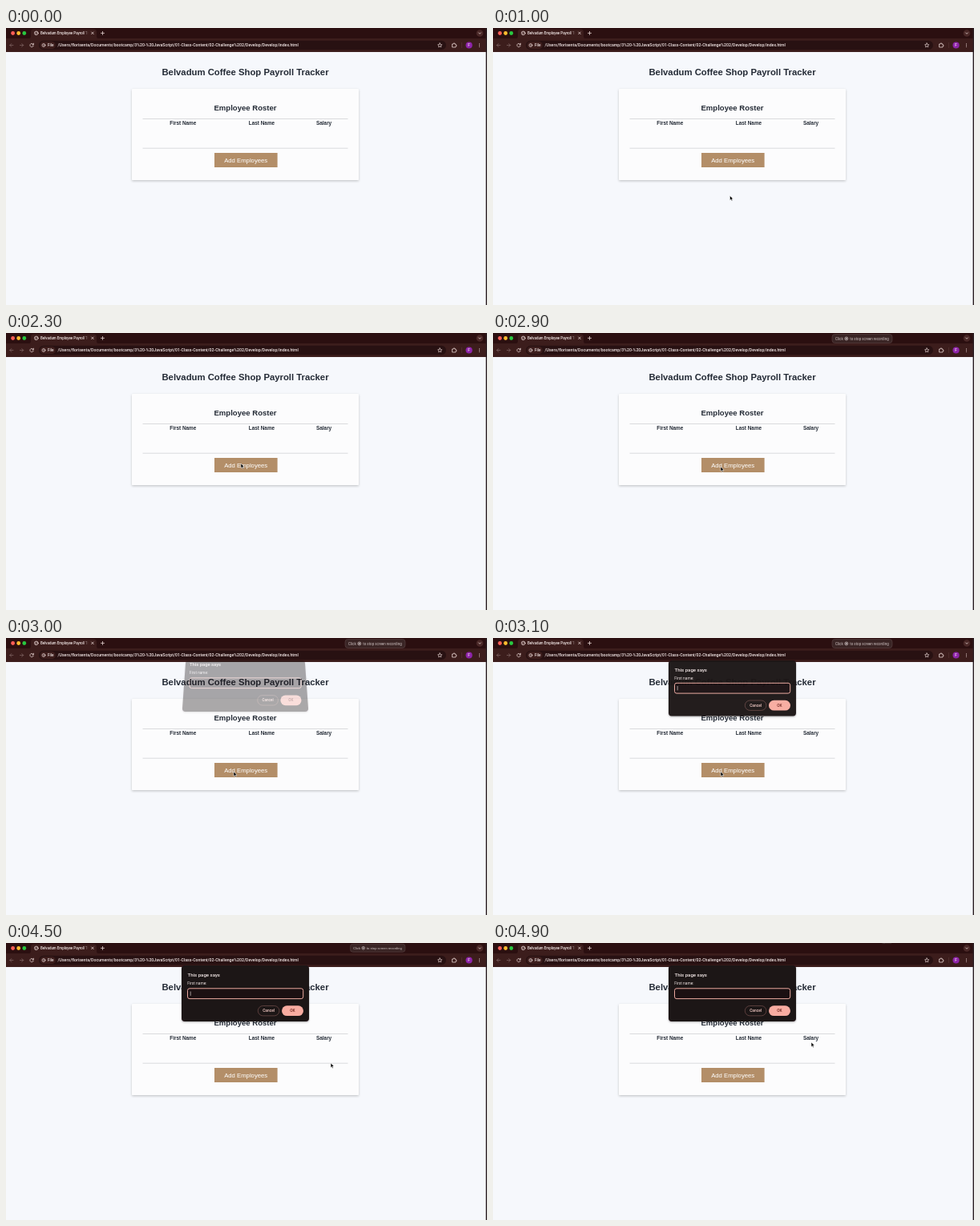
Animation, 600 px wide and 346 px high, one loop 5 s. Source, as an HTML page:

```html
<!DOCTYPE html>
<html lang="en">
<head>
<meta charset="utf-8">
<title>Payroll Tracker</title>
<style>
  html, body { margin: 0; width: 100%; height: 100%; overflow: hidden; background: #f6f8fc; }
  svg { display: block; width: 100%; height: 100%; }
  text { white-space: pre; }
  .page { font-family: "Liberation Sans", Arial, sans-serif; font-weight: 700; fill: #242b36; text-anchor: middle; }
  .ui { font-family: Roboto, Inter, sans-serif; font-weight: 500; fill: #f4e9e8; }
  .line { fill: none; stroke: #e6d3d1; stroke-width: .8; stroke-linecap: round; stroke-linejoin: round; }
  .dim { stroke: #7d6160; }
</style>
</head>
<body>
<svg viewBox="0 0 600 346">
  <defs>
    <filter id="cardShadow" x="-10%" y="-10%" width="120%" height="130%">
      <feDropShadow dx="0" dy="1.2" stdDeviation="1.5" flood-color="#000" flood-opacity=".22"/>
    </filter>
    <filter id="boxShadow" x="-10%" y="-10%" width="120%" height="130%">
      <feDropShadow dx="0" dy="1" stdDeviation="1.2" flood-color="#000" flood-opacity=".3"/>
    </filter>
    <linearGradient id="fade" gradientUnits="userSpaceOnUse" x1="96" x2="103" y1="0" y2="0">
      <stop offset="0" stop-color="#f4e9e8"/>
      <stop offset="1" stop-color="#f4e9e8" stop-opacity="0"/>
    </linearGradient>
    <clipPath id="tabClip"><rect x="40" y="0" width="63" height="13"/></clipPath>
  </defs>

  <!-- page -->
  <rect width="600" height="346" fill="#f6f8fc"/>
  <g class="page">
    <text x="298.5" y="59" font-size="11.32">Belvadum Coffee Shop Payroll Tracker</text>
    <rect x="157" y="76" width="283" height="114" rx="1" fill="#fcfcfd" filter="url(#cardShadow)"/>
    <text x="298.5" y="103.4" font-size="9.55">Employee Roster</text>
    <path d="M170.5 113.5H426.5M170.5 150.2H426.5" stroke="#d2d3d6" stroke-width=".8"/>
    <g font-size="6.4">
      <text x="220.8" y="120.8">First Name</text>
      <text x="319" y="120.8">Last Name</text>
      <text x="396.6" y="120.8">Salary</text>
    </g>
    <rect x="260" y="156" width="78.6" height="18" fill="#b38e68"/>
    <text x="299.2" y="167.6" font-size="7.72" style="font-weight:400;fill:#fff">Add Employees</text>
  </g>

  <!-- browser frame -->
  <rect width="600" height="14" fill="#2b0f10"/>
  <rect y="13" width="600" height="17" fill="#3c1d1c"/>
  <path d="M28 13.2q3 0 3-3V5q0-3.5 3.5-3.5h75q3.500 0 3.500 3.500v5.200q0 3 3 3z" fill="#3c1d1c"/>
  <circle cx="8.600" cy="6.500" r="2.400" fill="#ff5f57"/>
  <circle cx="15.700" cy="6.500" r="2.400" fill="#febc2e"/>
  <circle cx="22.800" cy="6.500" r="2.400" fill="#28c840"/>
  <g class="line">
    <circle cx="37.800" cy="6.400" r="2.300"/>
    <path d="M36 5.600l1.600.8-.5 1.600M38.400 4.500l.4 1.200 1 .4" stroke-width=".6"/>
    <path d="M106.600 5l2.700 2.700m0-2.700l-2.700 2.700M118.500 6.400h4m-2-2v4"/>
  </g>
  <g clip-path="url(#tabClip)">
    <text class="ui" x="43" y="8" font-size="4.45" style="fill:url(#fade)">Belvadum Employee Payroll Tracker</text>
  </g>
  <circle cx="591" cy="6.500" r="4.300" fill="#4a2827"/>
  <path class="line" d="M589.600 5.900l1.400 1.400 1.400-1.400"/>

  <rect x="41" y="15.800" width="508" height="11.400" rx="5.700" fill="#281112"/>
  <rect x="42.500" y="17" width="19.300" height="9" rx="4.500" fill="#3c1d1c"/>
  <path class="line dim" d="M9 21.500H4.800m2-2l-2 2 2 2M17.500 21.500h4.200m-2-2l2 2-2 2"/>
  <g class="line">
    <path d="M34.200 20.700a2.200 2.200 0 1 0 0 1.700M34.400 19.200v1.700h-1.700"/>
    <circle cx="47" cy="21.500" r="2" stroke-width=".7"/>
    <path d="M47 21.400v1M47 20.500v.05" stroke-width=".7"/>
    <path d="M541.200 18.900l.8 1.700 1.800.2-1.300 1.300.3 1.800-1.600-.9-1.600.9.300-1.800-1.300-1.300 1.800-.2z" stroke-width=".7"/>
    <path d="M557 20h1.200q-.2-1.200.8-1.200t.8 1.200h1.200v1.200q1.200-.1 1.200.8t-1.200.8V24h-4z"/>
  </g>
  <text class="ui" x="52" y="23.300" font-size="4.600">File</text>
  <text class="ui" x="64.500" y="23.300" font-size="5.200">/Users/florisenta/Documents/bootcamp/3%20-%20JavaScript/01-Class-Content/02-Challenge%202/Develop/Develop/index.html</text>
  <path d="M568.500 18v7" stroke="#5a3837" stroke-width=".6"/>
  <circle cx="577.600" cy="21.500" r="4.100" fill="#8e24aa"/>
  <text class="ui" x="577.600" y="23.100" font-size="4.500" text-anchor="middle">F</text>
  <g fill="#e6d3d1">
    <circle cx="590.500" cy="19.700" r=".55"/><circle cx="590.500" cy="21.500" r=".55"/><circle cx="590.500" cy="23.300" r=".55"/>
  </g>
  <rect x="598.600" width="1.400" height="346" fill="#2c2024"/>

  <!-- recording hint, centred on its own origin -->
  <g id="hint">
    <rect x="-37.500" y="-5.500" width="75" height="11" rx="3.500" fill="#3a2525" stroke="#5d4646" stroke-width=".6"/>
    <g class="ui" font-size="4.500" style="font-weight:400">
      <text x="-33.500" y="1.500" fill="#cfc3c3">Click</text>
      <text x="-15.300" y="1.500" fill="#cfc3c3">to stop screen recording</text>
    </g>
    <circle cx="-19.700" r="2" fill="none" stroke="#d8cdcd" stroke-width=".7"/>
    <circle cx="-19.700" r=".9" fill="#d8cdcd"/>
  </g>

  <!-- prompt -->
  <g id="prompt">
    <path id="panel" fill="#1f1315" filter="url(#boxShadow)"/>
    <g id="form" class="ui">
      <text x="226.500" y="42.200" font-size="6.050">This page says</text>
      <text x="226.300" y="52" font-size="4.850" style="font-weight:400">First name:</text>
      <rect x="226.500" y="56.800" width="144.200" height="12.800" rx="2.500" fill="#1b1012" stroke="#eba99f"/>
      <path id="caret" d="M230.200 60.500v5.400" stroke="#f4e9e8" stroke-width=".6"/>
      <rect x="314.300" y="78.500" width="26.600" height="12.400" rx="6.200" fill="none" stroke="#74504d" stroke-width=".7"/>
      <rect x="344" y="78.300" width="27" height="12.800" rx="6.400" fill="#f8aca1"/>
      <g text-anchor="middle" font-size="4.800">
        <text x="327.600" y="86.400" style="fill:#f9cfc9">Cancel</text>
        <text x="357.400" y="86.400" style="fill:#6a211c">OK</text>
      </g>
    </g>
  </g>

  <path id="cursor" d="M0 0v5.700l1.300-1.200.9 2 1-.45-.9-1.950h1.800z" fill="#000" stroke="#fff" stroke-width=".5" stroke-linejoin="round"/>
</svg>
<script>
const LOOP = 5000, STEP = 100;
const el = id => document.getElementById(id);
const [hint, prompt, panel, form, caret, cursor] =
  ["hint", "prompt", "panel", "form", "caret", "cursor"].map(el);

// pointer stops: time, x, y
const stops = [
  [100, 203, 263], [600, 203, 263], [1000, 295.5, 209.500], [1200, 292, 176],
  [1800, 293, 163], [2300, 293, 163], [2800, 284, 167], [3100, 284, 167],
  [3700, 406, 153], [4400, 406, 153], [4900, 397, 124]
];

const clamp = v => Math.min(1, Math.max(0, v));
const ease = v => v * v * (3 - 2 * v);
const ramp = (t, a, b) => ease(clamp((t - a) / (b - a)));
const show = (node, on) => node.setAttribute("visibility", on ? "visible" : "hidden");
const move = (node, value) => node.setAttribute("transform", value);

function pointAt(t) {
  let i = 0;
  while (i < stops.length - 2 && t >= stops[i + 1][0]) i++;
  const [ta, xa, ya] = stops[i], [tb, xb, yb] = stops[i + 1];
  const k = ramp(t, ta, tb);
  return [xa + (xb - xa) * k, ya + (yb - ya) * k];
}

// rounded panel whose top edge can be narrower than its bottom
function panelPath(top, bottom, inset, r = 4) {
  const l = 219 + inset, m = 378 - inset, foot = inset / 5;
  const a = 219 + foot, b = 378 - foot;
  return `M${l + r} ${top}H${m - r}Q${m} ${top} ${m} ${top + r}L${b} ${bottom - r}` +
    `Q${b} ${bottom} ${b - r} ${bottom}H${a + r}Q${a} ${bottom} ${a} ${bottom - r}L${l} ${top + r}Q${l} ${top} ${l + r} ${top}Z`;
}

function drawHint(t) {
  const p = ramp(t, 2300, 2800) * (1 - .84 * ramp(t, 4400, 4900));
  show(hint, p > 0);
  move(hint, `translate(${497 - 36.500 * p} ${7 * p - 1.200 * (1 - p)}) scale(${p})`);
}

function drawPrompt(t) {
  const opening = t < 3100, settling = t < 3200;
  show(prompt, t >= 3000);
  prompt.setAttribute("opacity", opening ? .36 : settling ? .97 : 1);
  panel.setAttribute("d", opening ? panelPath(28, 92, 5) : panelPath(28, settling ? 97.500 : 98, 0));
  move(form, opening ? "translate(10.450 -6.900) scale(.965 1)" : `translate(0 ${settling ? -.5 : 0})`);
  caret.setAttribute("opacity", t >= 3100 && (t - 3100) % 1000 < 500 ? 1 : 0);
}

function draw(now) {
  const t = Math.floor((now % LOOP) / STEP) * STEP;
  show(cursor, t >= 100);
  move(cursor, `translate(${pointAt(t).join(" ")})`);
  drawHint(t);
  drawPrompt(t);
}

const start = performance.now();
function tick() {
  draw(performance.now() - start);
  requestAnimationFrame(tick);
}
tick();
</script>
</body>
</html>
```
